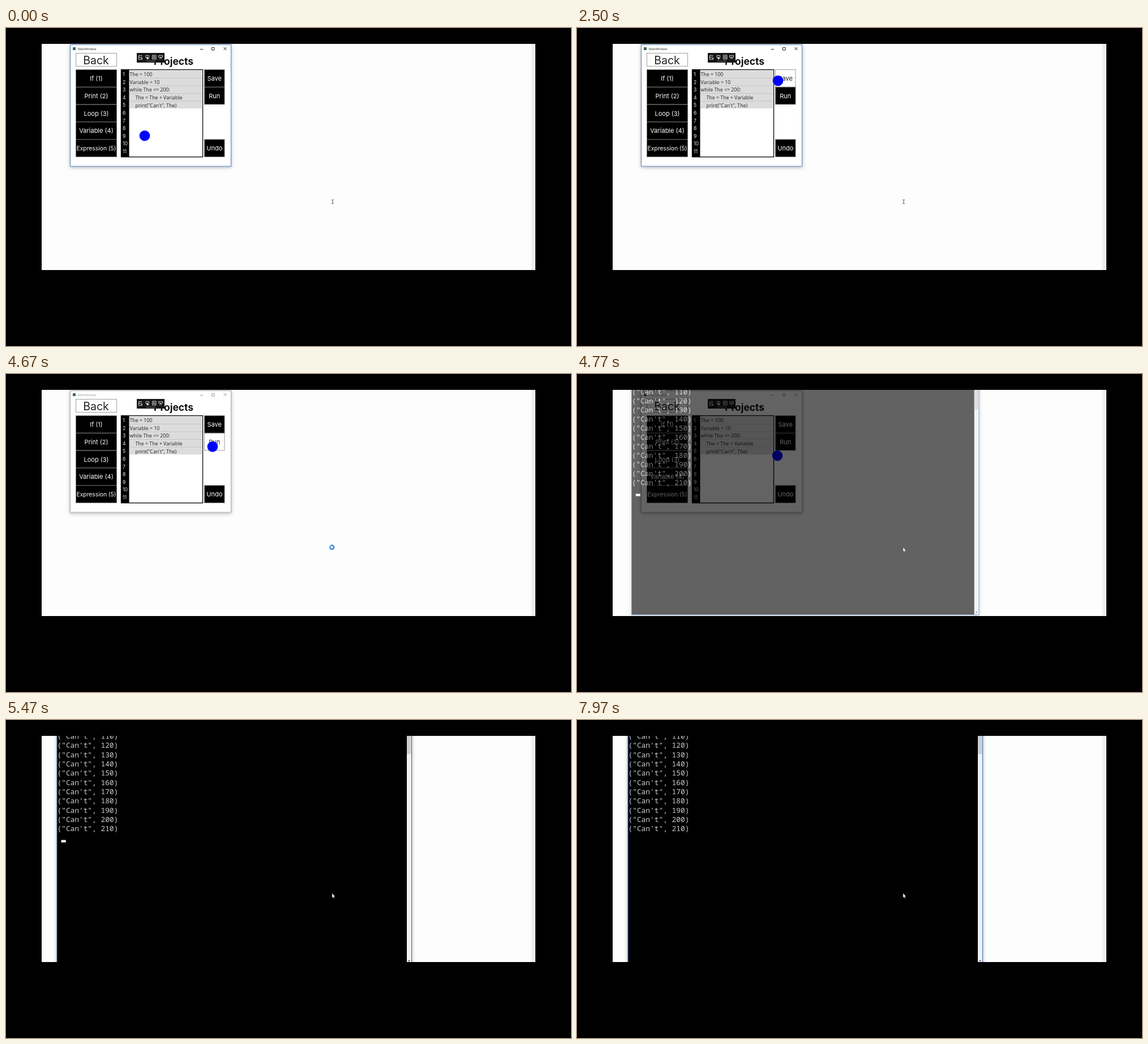
An HTML page that plays this animation: 998 by 561 pixels, repeating every 8000 ms.

```html
<!DOCTYPE html>
<html lang="en">
<head>
<meta charset="utf-8">
<title>Block editor run</title>
<style>
  html, body { margin: 0; width: 100%; height: 100%; overflow: hidden; background: #000; }
  svg { display: block; width: 998px; height: 561px; }
  text { font-family: Inter, "Open Sans", sans-serif; white-space: pre; }
  .code { font-family: "Open Sans", "Noto Sans", sans-serif; }
  .mono { font-family: "Noto Sans Mono", "DejaVu Sans Mono", monospace; }
  .button rect { fill: #000; stroke: #777; stroke-width: .7; }
  .button text { fill: #fff; }
  .button.hover rect { fill: #fff; }
  .button.hover text { fill: #222; }
  #frame { stroke: #5585c4; }
  #titlebar { fill: #222; stroke: #222; }
  .inactive #frame { stroke: #aaa; }
  .inactive #titlebar { fill: #999; stroke: #999; }
</style>
</head>
<body>
<svg id="stage" viewBox="0 0 998 561"></svg>
<script>
const LOOP = 8000, BUSY_AT = 4480, CONSOLE_AT = 4701;

// Ball waypoints: time, x, y
const ballPath = [
  [0, 245, 190], [900, 252, 182], [1700, 300, 140], [2500, 355, 93], [3300, 364, 98],
  [3900, 378, 115], [4670, 365, 128], [4770, 354, 144], [4900, 350, 149], [LOOP, 348, 151]
];

const escapeText = s => s.replace(/&/g, '&amp;').replace(/</g, '&lt;');
const rect = (x, y, w, h, fill, extra = '') =>
  `<rect x="${x}" y="${y}" width="${w}" height="${h}" fill="${fill}" ${extra}/>`;
const line = (d, color, width = 1) =>
  `<path d="${d}" fill="none" stroke="${color}" stroke-width="${width}"/>`;
// The given y is the middle of the capitals.
const label = (s, x, y, size, fill, extra = '') =>
  `<text x="${x}" y="${y + size * .36}" font-size="${size}" ${fill ? `fill="${fill}"` : ''} ${extra}>${escapeText(s)}</text>`;
const middle = 'text-anchor="middle"';
const button = (s, x, y, w, size = 11, id = '') =>
  `<g class="button" id="${id}">${rect(x + .5, y + .5, w, 30.5, '#000')}${label(s, x + w / 2 + .5, y + 16, size, '', middle)}</g>`;

function editor() {
  const blocks = ['If (1)', 'Print (2)', 'Loop (3)', 'Variable (4)', 'Expression (5)'];
  const code = ['The = 100', 'Variable = 10', 'while The <= 200:', '    The = The + Variable', '    print("Can\'t", The)'];
  const rowY = i => 82 + 13.6 * i;
  return `<g id="editor">
    ${rect(113.5, 29.5, 284, 214.5, '#fff', 'id="frame" filter="url(#shadow)"')}
    ${rect(118, 34, 5, 5, '#3c6b58')}
    <g id="titlebar">
      ${label('MainWindow', 127, 36.7, 5.3, '', 'class="code" stroke="none"')}
      <path d="M343 37.5h5M363.5 34.5h4.5v4.5h-4.5zM384.5 34l5 5m0-5l-5 5" fill="none"/>
    </g>
    ${rect(123.5, 44.5, 72, 23, '#fff', 'stroke="#888" stroke-width=".8"')}
    ${label('Back', 159, 57, 19.5, '#222', middle)}
    ${label('Projects', 331, 58.5, 17.4, '#111', 'text-anchor="end" font-weight="700"')}
    ${rect(231, 44, 49, 17, '#171717')}
    ${line('M248 58.5h16', '#666')}
    ${line('M234.5 48.5h5v2M234.5 48.5v7h3M234 51.5h4M238.5 52.5h2v3h-2zM247 48.5h5.500v4M247 48.5v4h2M258.500 48h6.500v7h-6.500zM260.500 50h2.500v3h-2.500zM269.500 48.500h7v3h-7zM271 55l2-3l2 3', '#ddd', .9)}
    <path d="M249 50v6l1.500-1.500h2.500z" fill="#fff"/>
    ${rect(203.5, 73.5, 144, 154, '#fff', 'stroke="#111" stroke-width="1.4"')}
    ${rect(203, 73, 14.5, 154.5, '#000')}
    ${rect(218, 75, 129, 67, '#dcdcdc')}
    ${code.map((s, i) => (i ? line(`M218 ${74.7 + 13.6 * i}h129`, '#bbb', .7) : '')
      + label(s.trim(), s.startsWith(' ') ? 228.500 : 218.500, rowY(i), 8.8, '#222', 'class="code"')).join('')}
    ${Array.from({ length: 11 }, (_, i) => label(String(i + 1), 206, rowY(i), 8.6, '#eee')).join('')}
    ${blocks.map((s, i) => button(s, 123, 73 + 30.8 * i, 72, i === 4 ? 10.3 : 11)).join('')}
    ${button('Save', 350, 73, 35.5, 11, 'save')}
    ${button('Run', 350, 103.8, 35.5, 11, 'run')}
    ${button('Undo', 350, 196.2, 35.5)}
  </g>`;
}

function consoleWindow() {
  const rows = Array.from({ length: 11 }, (_, i) =>
    label(`("Can't", ${110 + i * 10})`, 90.5, 191.7 - 16.33 * (10 - i), 12.85, '#ccc', 'class="mono"'));
  return `<g id="console">
    ${rect(89.5, 0, 627.5, 430, '#2f6db5', 'filter="url(#shadow)"')}
    ${rect(90.5, 0, 618, 429, '#000')}
    ${rect(708, 0, 8, 429, '#f0f0f0')}
    ${rect(708, 20, 7.500, 40, '#cdcdcd')}
    <path d="M710 424h4l-2 2.500z" fill="#555"/>
    ${rows.join('')}
    ${rect(97.5, 211.7, 8.2, 4.3, '#fff', 'id="caret"')}
  </g>`;
}

const stage = document.getElementById('stage');
stage.innerHTML = `
  <defs>
    <filter id="shadow" x="-5%" y="-5%" width="110%" height="110%">
      <feDropShadow dx="0" dy="1.500" stdDeviation="3" flood-color="#000" flood-opacity=".3"/>
    </filter>
    <clipPath id="screen"><rect x="63" y="28" width="872" height="399"/></clipPath>
  </defs>
  ${rect(0, 0, 998, 561, '#000')}
  <g clip-path="url(#screen)">
    ${rect(63, 28, 872, 399, '#fdfdfd')}
    ${rect(928, 28, 7, 399, '#eeeef2')}
    ${editor()}
    <circle id="ball" r="9.3" fill="#00f"/>
    ${consoleWindow()}
    <g id="beam">${line('M575 303h1.500l.500.500l.500-.500h1.500M577 303.500v6M575 309.800h1.500l.500-.500l.500.500h1.500', '#444', .9)}</g>
    <g id="spinner" fill="none" stroke-width="2.2">
      <circle cx="575.7" cy="305.7" r="3.5" stroke="#2f80cf"/>
      <path d="M575.7 302.2a3.500 3.500 0 0 1 3.500 3.500" stroke="#69b4ee"/>
    </g>
    <path id="arrow" d="M576 305.500v8l1.800-1.500l1.200 2.700l1.200-.600l-1.100-2.500h2z" fill="#fff" stroke="#222" stroke-width=".4"/>
  </g>`;

const part = id => document.getElementById(id);
const show = (id, on) => part(id).setAttribute('visibility', on ? 'visible' : 'hidden');

function ballAt(t) {
  const i = ballPath.findIndex(p => p[0] > t);
  const [t0, x0, y0] = ballPath[i - 1], [t1, x1, y1] = ballPath[i];
  const u = (t - t0) / (t1 - t0);
  return [x0 + (x1 - x0) * u, y0 + (y1 - y0) * u];
}

function draw(t) {
  const [x, y] = ballAt(t);
  part('ball').setAttribute('cx', x);
  part('ball').setAttribute('cy', y);
  const overColumn = x > 350 && x < 386;
  part('save').classList.toggle('hover', overColumn && y > 73 && y < 104);
  part('run').classList.toggle('hover', overColumn && y >= 104 && y < 135);

  const busy = t >= BUSY_AT, open = t >= CONSOLE_AT;
  part('editor').classList.toggle('inactive', busy);
  show('beam', !busy);
  show('spinner', busy && !open);
  part('spinner').setAttribute('transform', `rotate(${t * .36} 575.7 305.7)`);
  show('arrow', open);

  // The console fades in while it grows to full size.
  const rest = open ? Math.exp((CONSOLE_AT - t) / 75) : 1;
  part('console').setAttribute('opacity', 1 - rest);
  part('console').setAttribute('transform',
    `translate(403.5 192) scale(${1 - .052 * rest}) translate(-403.5 -192)`);
  show('caret', open && (t - 4430) % 1000 < 500);
}

function tick() {
  draw(performance.now() % LOOP);
  requestAnimationFrame(tick);
}
tick();
</script>
</body>
</html>
```
